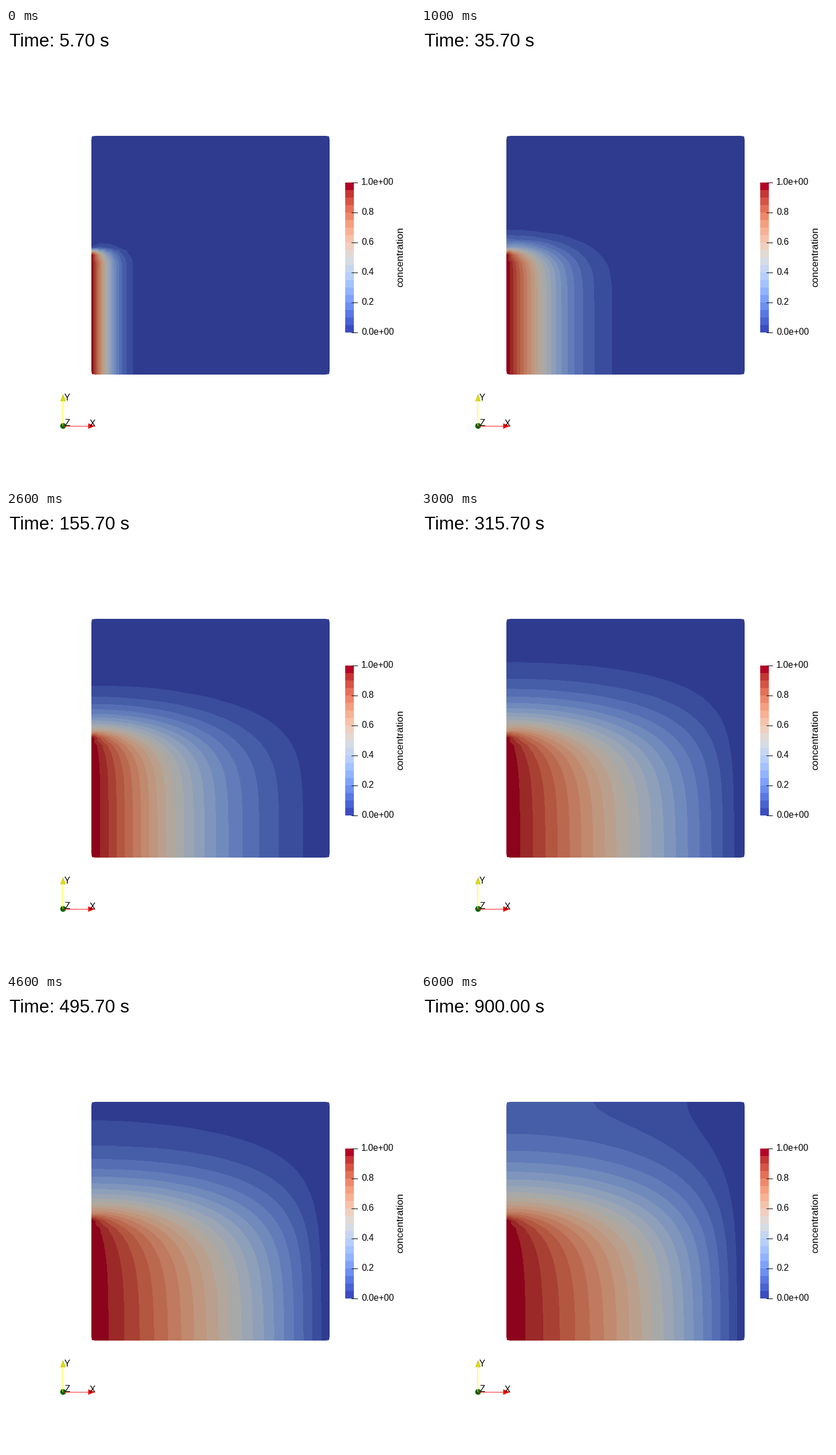
Animation, 709 px wide and 789 px high, one loop 7000 ms. Source, as a matplotlib script:

```python
import numpy as np
import matplotlib.pyplot as plt
from matplotlib.animation import FuncAnimation
from matplotlib.patches import Circle, Polygon, Rectangle
from matplotlib.tri import Triangulation

W, H, DPI = 709, 789, 64
LEFT, RIGHT, TOP, BOTTOM = 148, 561, 187, 601

# Transport: uniform flow to the right, dispersion along and across it
CELLS = 32
SPEED = 6.195e-4
D_LONG = 1e-5 + 1.0 * SPEED
D_TRANS = 1e-5 + 0.1 * SPEED
TIMES = [5.7, 35.7, 155.7, 315.7, 495.7, 720.7, 900.0]


def band(n, low, mid, high, end_low, end_high):
    m = np.diag(np.full(n, mid)) + np.diag(np.full(n - 1, low), -1)
    m += np.diag(np.full(n - 1, high), 1)
    m[0, 0], m[-1, -1] = end_low, end_high
    return m


def element_matrices():
    n, h = CELLS + 1, 1 / CELLS
    mass = band(n, h / 6, 4 * h / 6, h / 6, h / 3, h / 3)
    stiff = band(n, -1 / h, 2 / h, -1 / h, 1 / h, 1 / h)
    advect = band(n, -0.5, 0.0, 0.5, -0.5, 0.5)
    return mass, stiff, advect


def simulate():
    """Implicit Euler, diagonalised in y; returns the field at each of TIMES."""
    mass, stiff, advect = element_matrices()
    # The right side is held at zero, so its nodes are dropped.
    mx = mass[:-1, :-1]
    kx = (D_LONG * stiff + SPEED * advect)[:-1, :-1]

    inv_l = np.linalg.inv(np.linalg.cholesky(mass))
    mu, q = np.linalg.eigh(D_TRANS * inv_l @ stiff @ inv_l.T)
    modes = inv_l.T @ q
    held = CELLS // 2 + 1

    def stepper(dt):
        inv = np.linalg.inv((1 + dt * mu)[:, None, None] * mx + dt * kx)
        wall = (modes * inv[:, 0, 0]) @ modes.T
        wall_inv = np.linalg.inv(wall[:held, :held])

        def solve(load):
            return np.einsum("mij,jm->im", inv, load @ modes) @ modes.T

        def step(u):
            load = mx @ u @ mass
            free = solve(load)
            load[0, :held] += wall_inv @ (1 - free[0, :held])
            return solve(load)

        return step

    def advance(u, dt, span):
        step = stepper(dt)
        for _ in range(round(span / dt)):
            u = step(u)
        return u

    u = np.zeros((CELLS, CELLS + 1))
    u[0, :held] = 1
    u = advance(u, 0.1, TIMES[0])
    fields = [u]
    for span in np.diff(TIMES):
        u = advance(u, 5.0, span)
        fields.append(u)
    return [np.vstack([f, np.zeros(CELLS + 1)]).ravel() for f in fields]


def make_mesh():
    n = CELLS + 1
    i, j = np.meshgrid(np.arange(n), np.arange(n), indexing="ij")
    x = LEFT + (RIGHT - LEFT) * i.ravel() / CELLS
    y = BOTTOM - (BOTTOM - TOP) * j.ravel() / CELLS
    a = (i * n + j)[:-1, :-1].ravel()
    b, c, d = a + n, a + n + 1, a + 1
    tris = np.vstack([np.column_stack([a, b, c]), np.column_stack([a, c, d])])
    return Triangulation(x, y, tris)


def make_outline():
    """Domain edge, slightly drawn in at the corners."""
    far, near = 7, 1
    points = [
        (LEFT, TOP + far), (LEFT + near, TOP + near), (LEFT + far, TOP),
        (RIGHT - far, TOP), (RIGHT - near, TOP + near), (RIGHT, TOP + far),
        (RIGHT, BOTTOM - far), (RIGHT - near, BOTTOM - near),
        (RIGHT - far, BOTTOM), (LEFT + far, BOTTOM),
        (LEFT + near, BOTTOM - near), (LEFT, BOTTOM - far),
    ]
    return Polygon(points, transform=ax.transData)


fig = plt.figure(figsize=(W / DPI, H / DPI), dpi=DPI, facecolor="white")
ax = fig.add_axes([0, 0, 1, 1])
ax.set_xlim(0, W)
ax.set_ylim(H, 0)
ax.axis("off")


def label(x, y, text, px, **kw):
    return ax.text(x, y, text, fontsize=px * 72 / DPI, color="black",
                   family="Liberation Sans", **kw)


def line(xs, ys, color):
    ax.plot(xs, ys, color=color, lw=72 / DPI, solid_capstyle="butt",
            snap=False)


def draw_legend(colors):
    x, top, cell = 588, 268, 13
    for k, color in enumerate(colors):
        y = top + cell * (len(colors) - 1 - k)
        ax.add_patch(Rectangle((x, y), 15, cell, fc=color, lw=0,
                               antialiased=False))
    names = ["1.0e+00", "0.8", "0.6", "0.4", "0.2", "0.0e+00"]
    for k, name in enumerate(names):
        y = top + 52 * k
        line([599, 610], [y + 0.5] * 2, "black")
        label(616, y + 4.2, name, 15.5)
    label(691, 396.5, "concentration", 17.2, rotation=90,
          ha="right", va="center")


def draw_triad():
    line([98.5, 98.5], [690, 646], "#ffff00")
    line([99, 144], [690.5, 690.5], "#ff2020")
    ax.add_patch(Polygon([(98.8, 635.5), (103, 647), (94.6, 647)],
                         fc="#dede00", ec="#8c8c00", lw=0.4))
    ax.add_patch(Polygon([(154, 690.3), (142.5, 685.5), (142.5, 695)],
                         fc="#f00000", lw=0))
    ax.add_patch(Circle((99, 690), 5, fc="#006400", lw=0))
    for x, y, name in [(106, 646.5, "Y"), (106.7, 690, "Z"), (150, 691, "X")]:
        label(x, y, name, 15.5, ha="center")


palette = plt.get_cmap("coolwarm")(np.linspace(0, 1, 20))[:, :3]
shaded = palette * [0.78, 0.77, 0.74]
fills = [shaded[0], *shaded, shaded[-1]]
levels = np.linspace(0, 1, 21)

draw_legend(palette)
draw_triad()
clock = label(6.5, 32, "", 31.5)
mesh = make_mesh()
outline = make_outline()
fields = simulate()
shown = []


def draw(k):
    while shown:
        shown.pop().remove()
    bands = ax.tricontourf(mesh, fields[k], levels=levels, colors=fills,
                           extend="both")
    bands.set_clip_path(outline)
    shown.append(bands)
    ax.set_xlim(0, W)
    ax.set_ylim(H, 0)
    clock.set_text(f"Time: {TIMES[k]:.2f} s")
    return []


anim = FuncAnimation(fig, draw, frames=len(TIMES), init_func=lambda: [],
                     interval=1000, repeat=True, repeat_delay=0, blit=False)
plt.show()
```
